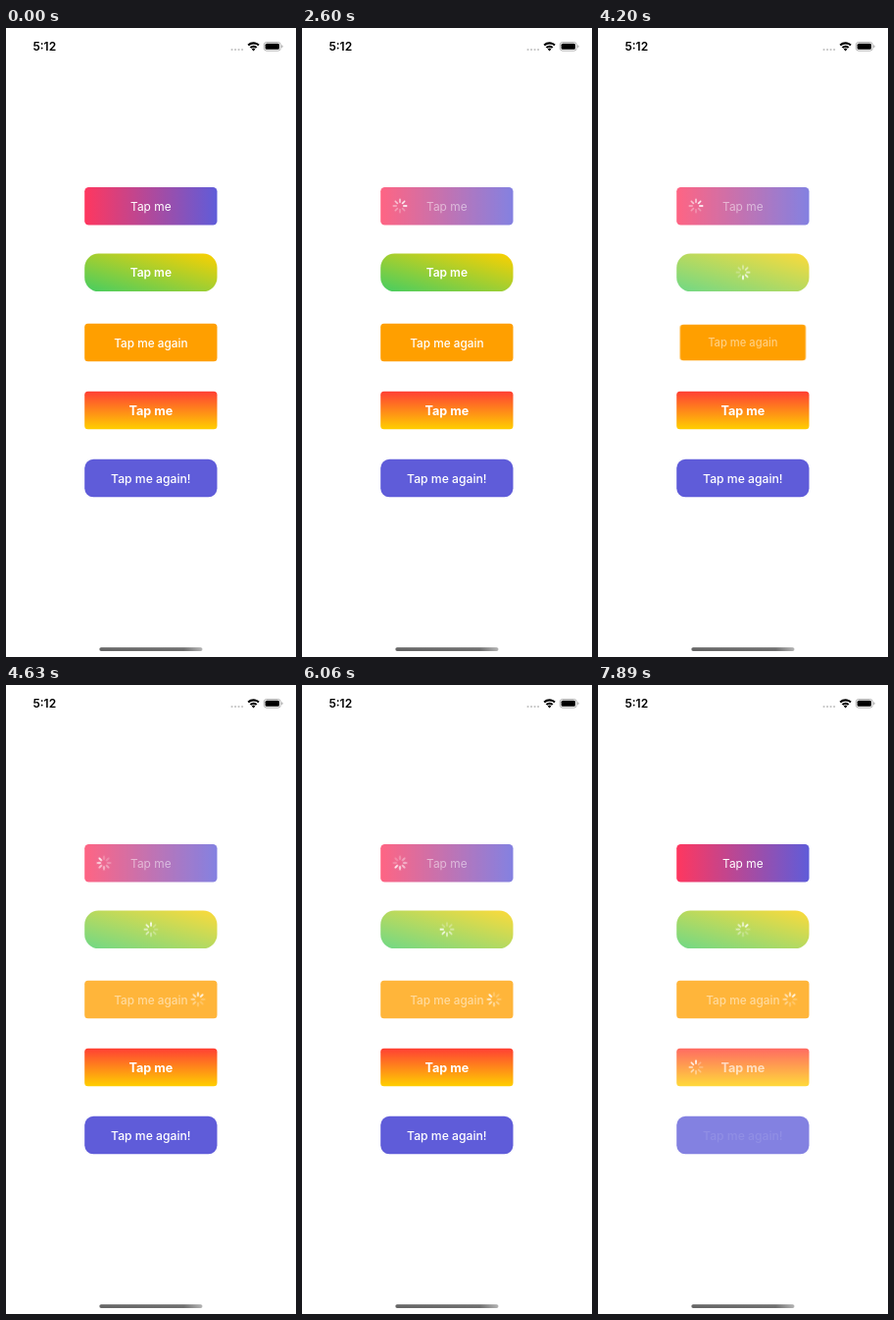
Write an HTML page that moves like this. It is 296 by 640 pixels and loops after 8 s.

```html
<!DOCTYPE html>
<html lang="en">
<head>
<meta charset="utf-8">
<title>Loading buttons</title>
<style>
html, body { margin: 0; width: 100%; height: 100%; overflow: hidden; background: #fff; }
svg { display: block; }
text { font-family: Inter, "Liberation Sans", sans-serif; text-anchor: middle; }
.time { font-size: 12px; font-weight: 600; }
</style>
</head>
<body>
<svg id="stage" width="296" height="640" viewBox="0 0 296 640">
  <defs>
    <linearGradient id="bar">
      <stop offset="0" stop-color="#666"/>
      <stop offset=".82" stop-color="#707070"/>
      <stop offset="1" stop-color="#b4b4b4"/>
    </linearGradient>
    <linearGradient id="berry">
      <stop stop-color="#ff375f"/><stop offset="1" stop-color="#5f5cd9"/>
    </linearGradient>
    <linearGradient id="lime" x1="0" y1="1" x2="1" y2="0">
      <stop stop-color="#45cd62"/><stop offset="1" stop-color="#fdd000"/>
    </linearGradient>
    <linearGradient id="sunset" x2="0" y2="1">
      <stop stop-color="#ff3f34"/><stop offset="1" stop-color="#ffcf00"/>
    </linearGradient>
  </defs>
  <text class="time" x="39.3" y="23">5:12</text>
  <g fill="#c4c4c4">
    <circle cx="230.6" cy="22" r="1.1"/><circle cx="234.1" cy="22" r="1.1"/>
    <circle cx="237.6" cy="22" r="1.1"/><circle cx="241.1" cy="22" r="1.1"/>
  </g>
  <g fill="none" stroke="#000" stroke-width="2.1">
    <path d="M247.2 17.5a7.8 7.8 0 0 1 10.8 0"/>
    <path d="M249.5 20a4.5 4.5 0 0 1 6.2 0"/>
  </g>
  <path d="M250.8 21.4a2.6 2.6 0 0 1 3.6 0L252.6 23.4z"/>
  <rect x="263.3" y="14.5" width="17" height="8.6" rx="2.6" fill="none" stroke="#a8a8a8" stroke-width=".9"/>
  <rect x="264.6" y="15.8" width="14.4" height="6" rx="1.5"/>
  <path d="M281.3 17.3q1.3 .4 1.3 1.5t-1.3 1.5z" fill="#a8a8a8"/>
  <rect x="95.3" y="630.2" width="105.2" height="3.7" rx="1.85" fill="url(#bar)"/>
</svg>
<script>
const LOOP = 8000, TURN = 800, DIM = 0.77;
const LEFT = 80.2, WIDTH = 135.3, HEIGHT = 38.5, MID = LEFT + WIDTH / 2;
const stage = document.getElementById("stage");

// Tracks are [ms, value] pairs; phase is when the bright spoke points up.
const buttons = [
  { y: 162, r: 4.3, fill: "url(#berry)",
    text: "Tap me", weight: 400, size: 11.9, spinX: 100, phase: 720,
    body: [[1640, 1], [1860, DIM], [6440, DIM], [6640, 1]],
    label: [[1640, 1], [1860, 0.5], [6440, 0.5], [6640, 1]],
    spin: [[1860, 0], [1960, 1], [6400, 1], [6480, 0]] },
  { y: 229.6, r: 14.3, fill: "url(#lime)",
    text: "Tap me", weight: 600, size: 12, spinX: 148, phase: 580,
    body: [[3030, 1], [3230, DIM]],
    label: [[3050, 1], [3220, 0]],
    spin: [[3230, 0], [3330, 1]] },
  { y: 300.8, r: 3.5, fill: "#ff9f00",
    text: "Tap me again", weight: 500, size: 11.8, spinX: 196, phase: 495,
    body: [[4210, 1], [4400, DIM]],
    label: [[4080, 1], [4200, 0.5]],
    spin: [[4400, 0], [4500, 1]],
    scale: [[4080, 1], [4200, 0.948], [4330, 1]] },
  { y: 369.8, r: 3.5, fill: "url(#sunset)",
    text: "Tap me", weight: 700, size: 12.6, spinX: 100, phase: 670,
    body: [[6460, 1], [6660, DIM]],
    label: [[6460, 1], [6660, 0.65]],
    spin: [[6660, 0], [6760, 1]] },
  { y: 438.8, r: 9, fill: "#5f5cd9",
    text: "Tap me again!", weight: 500, size: 12.2,
    body: [[7690, 1], [7890, DIM]],
    label: [[7700, 1], [7900, 0.06]] }
];

function add(parent, tag, attrs = {}) {
  const el = document.createElementNS("http://www.w3.org/2000/svg", tag);
  for (const key in attrs) el.setAttribute(key, attrs[key]);
  return parent.appendChild(el);
}

function play(el, track, prop = "opacity") {
  const all = [[0, track[0][1]], ...track, [LOOP, track[track.length - 1][1]]];
  const frames = all.map(([ms, v]) => ({ offset: ms / LOOP, [prop]: v }));
  el.animate(frames, { duration: LOOP, iterations: Infinity });
}

function addSpinner(parent, x, y, track, phase) {
  const place = add(parent, "g", { transform: `translate(${x} ${y})` });
  const fade = add(place, "g");
  const wheel = add(fade, "g", { stroke: "#fff", "stroke-width": 1.6, "stroke-linecap": "round" });
  for (let i = 0; i < 8; i++) {
    add(wheel, "path", {
      d: "M0-3.7V-6.7", opacity: Math.max(0.3, 1 - i * 0.13), transform: `rotate(${-45 * i})`
    });
  }
  wheel.style.transformOrigin = "0 0";
  play(fade, track);
  wheel.animate([{ transform: "rotate(0deg)" }, { transform: "rotate(360deg)" }], {
    duration: TURN, iterations: Infinity, easing: "steps(8)", delay: phase - TURN
  });
}

for (const b of buttons) {
  const midY = b.y + HEIGHT / 2;
  const btn = add(stage, "g");
  const body = add(btn, "rect", {
    x: LEFT, y: b.y, width: WIDTH, height: HEIGHT, rx: b.r, fill: b.fill
  });
  const label = add(btn, "text", {
    x: MID, y: midY + 4.6, fill: "#fff", "font-weight": b.weight, "font-size": b.size
  });
  label.textContent = b.text;
  play(body, b.body);
  play(label, b.label);
  if (b.scale) {
    btn.style.transformOrigin = `${MID}px ${midY}px`;
    play(btn, b.scale, "scale");
  }
  if (b.spin) addSpinner(btn, b.spinX, midY - 0.2, b.spin, b.phase);
}
</script>
</body>
</html>
```
